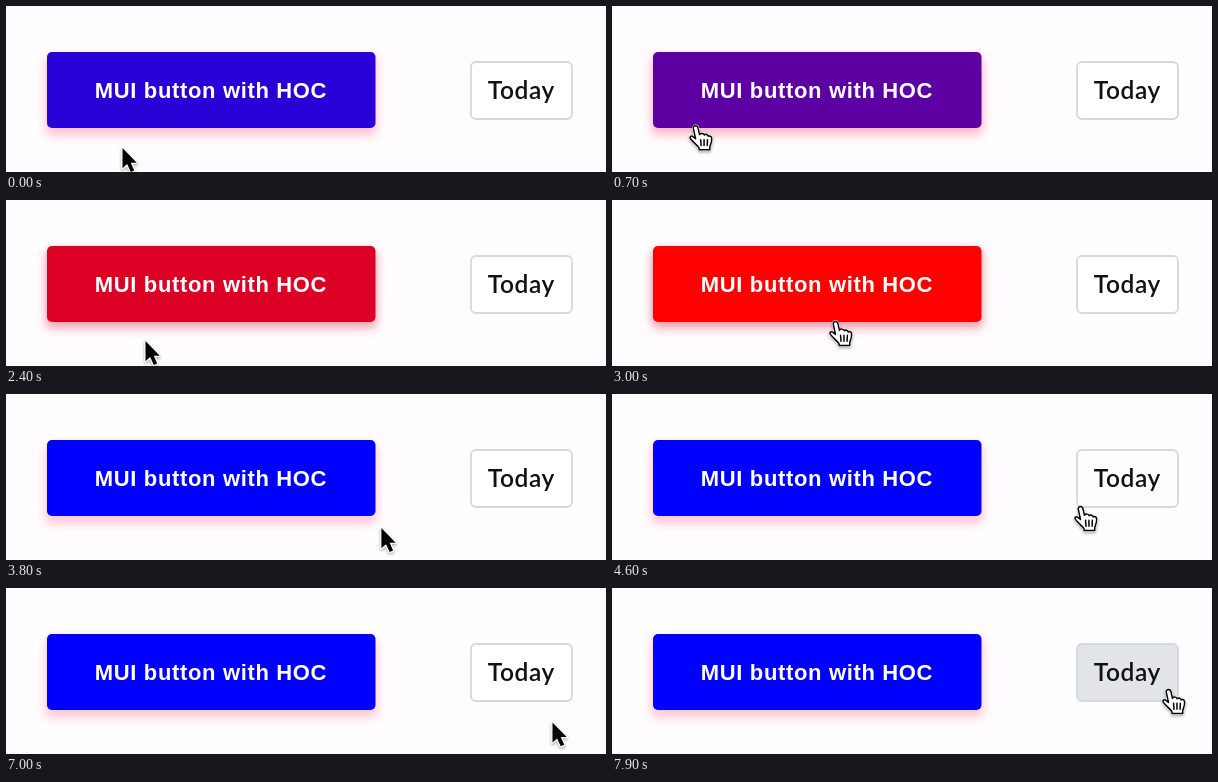
An HTML page with a canvas for the animation above (8 s loop, 600 by 166 pixels).

```html
<!DOCTYPE html>
<html lang="en">
<head>
<meta charset="utf-8">
<title>Buttons</title>
<style>
  html, body { margin: 0; width: 100%; height: 100%; overflow: hidden; background: #fffdff; }
  canvas { display: block; }
</style>
</head>
<body>
<canvas id="stage" width="600" height="166"></canvas>
<script>
const ctx = document.getElementById('stage').getContext('2d');
const LOOP = 8000, STEP = 100, FADE = 250;
const BUTTON = { x: 41, y: 46, w: 328.5, h: 76 };
const TODAY = { x: 465, y: 56, w: 101, h: 57 };

// Pointer stops: [time, x, y]
const stops = [
  [-250, 100, 118], [0, 116, 141], [1000, 69, 110], [2000, 69, 110], [2360, 131, 117],
  [2400, 139, 140], [2600, 175, 119], [3000, 223, 121], [3500, 340, 141], [4600, 468, 112],
  [6000, 506, 101], [7050, 548, 135], [7500, 556, 101], [LOOP, 556, 101]
];

const arrow = new Path2D('M0 0V22L5 17.5L9 26L12.7 24.4L9 16H15.5Z');
const hand = new Path2D('M-2.5 2C-2.8 -1 2 -1.8 2.7 2L4.3 9C6 7 9 7.5 9.5 9.5C11 8 13.5 9 13.8 10.8' +
  'C15.5 9.8 17.8 11 17.5 13.5C17.8 18 16 20 15.5 22V25.5H4L3.5 23C1 20 -3 17 -5.5 13.5' +
  'C-7 11 -4.5 9.5 -2.5 11.5L0 13.5Z');
const knuckles = new Path2D('M5.5 14.5L6 21M9.2 14.5V21M12.9 14.5L12.6 21');

const clamp = v => Math.max(0, Math.min(1, v));
const mix = (a, b, p) => a + (b - a) * p;

function pointerAt(t) {
  const i = stops.findIndex(s => s[0] > t);
  const [t0, x0, y0] = stops[i - 1], [t1, x1, y1] = stops[i];
  const p = (t - t0) / (t1 - t0);
  return [mix(x0, x1, p), mix(y0, y1, p)];
}

function hovers(r, t) {
  const [x, y] = pointerAt(t);
  return x >= r.x && x <= r.x + r.w && y >= r.y && y <= r.y + r.h;
}

// Share of the last FADE ms spent over the box: a linear fade in and out
function hoverLevel(r, t) {
  let hits = 0;
  for (let back = 0; back < FADE; back += 5) hits += hovers(r, t - back);
  return hits * 5 / FADE;
}

function box(r, radius, dx = 0) {
  ctx.beginPath();
  ctx.roundRect(r.x + dx, r.y, r.w, r.h, radius);
}

function shadow(color, blur, dy, dx = 0) {
  ctx.shadowColor = color;
  ctx.shadowBlur = blur;
  ctx.shadowOffsetX = dx;
  ctx.shadowOffsetY = dy;
}

function drawRipple(t) {
  const p = clamp((t - 1185) / 550);
  ctx.beginPath();
  ctx.arc(69, 111, 308 * (1 - (1 - p) ** 3), 0, 7);
  ctx.fillStyle = `rgba(155,0,0,${0.35 * clamp((t - 1100) / 300) * clamp((2300 - t) / 550)})`;
  ctx.fill();
}

function drawButton(t) {
  const red = hoverLevel(BUTTON, t);
  ctx.save();
  // The glow is cast by a larger box outside the stage
  box({ x: 39, y: 44, w: 332.5, h: 80 }, 7, -1000);
  ctx.fillStyle = '#000';
  shadow('rgba(255,105,135,.34)', 10, 6, 1000);
  ctx.fill();
  box(BUTTON, 5);
  ctx.fillStyle = `rgb(${255 * red},0,${255 * (1 - red)})`;
  shadow(`rgba(150,0,20,${0.25 * red})`, 8, 3);
  ctx.fill();
  shadow('transparent', 0, 0);
  ctx.clip();

  ctx.font = 'bold 22px "Liberation Sans", Arial, sans-serif';
  ctx.letterSpacing = '0.65px';
  ctx.fillStyle = '#fff';
  ctx.fillText('MUI button with HOC', 88.8, 91.6);
  drawRipple(t);
  ctx.restore();
}

function drawToday(t) {
  const hover = hoverLevel(TODAY, t), press = clamp((t - 7650) / FADE);
  const [r, g, b] = [237, 240, 242].map(v => mix(255, v, hover) - 11 * press);
  ctx.save();
  box(TODAY, 5);
  ctx.fillStyle = `rgb(${r},${g},${b})`;
  ctx.fill();
  ctx.strokeStyle = '#d5d8dc';
  ctx.lineWidth = 1.8;
  ctx.stroke();
  ctx.font = '600 24.5px Lato, sans-serif';
  ctx.letterSpacing = '0.6px';
  ctx.textAlign = 'center';
  ctx.fillStyle = '#111';
  ctx.fillText('Today', 515.3, 92.8);
  ctx.restore();
}

function drawPointer(t) {
  const hover = hovers(BUTTON, t) || hovers(TODAY, t);
  const shape = hover ? hand : arrow;
  ctx.save();
  ctx.translate(...pointerAt(t));
  ctx.translate(0.5, 1);
  ctx.scale(0.92, 0.92);
  ctx.lineJoin = ctx.lineCap = 'round';
  ctx.strokeStyle = '#fff';
  ctx.lineWidth = 2.6;
  shadow('rgba(0,0,0,.35)', 3, 1.5);
  ctx.stroke(shape);
  shadow('transparent', 0, 0);
  ctx.fillStyle = hover ? '#fff' : '#000';
  ctx.fill(shape);
  if (hover) {
    ctx.strokeStyle = '#000';
    ctx.lineWidth = 1.6;
    ctx.stroke(shape);
    ctx.stroke(knuckles);
  }
  ctx.restore();
}

function frame() {
  const t = Math.floor(performance.now() % LOOP / STEP) * STEP;
  ctx.fillStyle = '#fffdff';
  ctx.fillRect(0, 0, 600, 166);
  drawButton(t);
  drawToday(t);
  drawPointer(t);
  requestAnimationFrame(frame);
}
frame();
</script>
</body>
</html>
```
